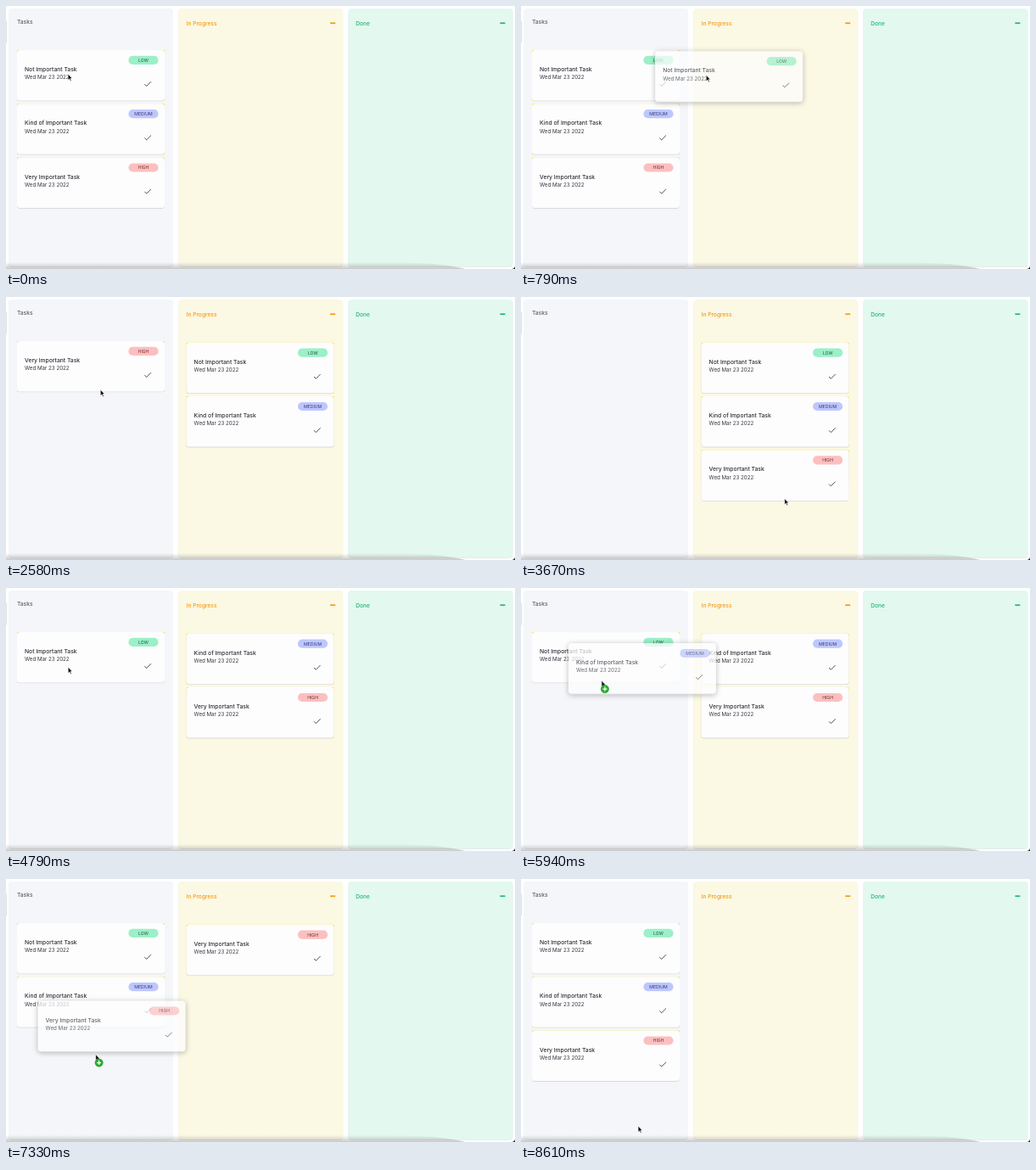
Recreate the animation shown at these times as an HTML page. Size 600 by 310 pixels, loop 8.88 s.

```html
<!DOCTYPE html>
<html lang="en">
<head>
<meta charset="utf-8">
<title>Task board</title>
<style>
html, body { margin: 0; width: 100%; height: 100%; overflow: hidden; background: #fff; }
svg { display: block; width: 100vw; height: 100vh; font-family: Inter, "Open Sans", sans-serif; }
.head { font-size: 6.65px; font-weight: 500; }
.title { font-size: 6.75px; font-weight: 500; fill: #2b2e34; }
.date { font-size: 6.2px; fill: #35383e; }
.pill { font-size: 5.15px; text-anchor: middle; }
.ghost { filter: drop-shadow(0 1.5px 3px rgba(0, 0, 0, .36)); opacity: .72; }
</style>
</head>
<body>
<svg viewBox="0 0 600 310">
  <defs>
    <linearGradient id="fade" x2="0" y2="1">
      <stop stop-color="#555" stop-opacity="0"/>
      <stop offset="1" stop-color="#555" stop-opacity=".32"/>
    </linearGradient>
  </defs>
  <rect width="600" height="310" fill="#fff"/>
  <g id="board"></g>
  <path d="M0 17.5V43.5" stroke="#d4d6d9" stroke-width="1.4"/>
  <path d="M0 302H470Q520 304 542 310H0Z" fill="url(#fade)"/>
  <path d="M600 306.5V310H596.5Q599.5 309.5 600 306.5Z" fill="#222"/>
  <g id="cards"></g>
  <g id="ghosts"></g>
  <g id="cursor">
    <path id="arrow" d="M0 0V7.4L1.7 5.9L2.9 8.5L4.2 7.9L3 5.4H5.2Z" fill="#111" stroke="#fff" stroke-width=".7" stroke-linejoin="round"/>
    <path id="hand" transform="translate(0 -1)" d="M-.8 .7Q0 -.4 .8 .7V3.3Q1.8 2.6 2.4 3.5Q3.3 3 3.8 3.9Q4.9 3.6 4.9 4.8V6.4L4 9H-.2L-2.4 5.8Q-2.6 4.4 -.8 5.5Z" fill="#fff" stroke="#222" stroke-width=".85" stroke-linejoin="round"/>
    <g id="badge" transform="translate(4 10)">
      <circle r="4.7" fill="#27ad2e" stroke="#178a20" stroke-width=".4"/>
      <path d="M-2.5 0H2.5M0 -2.5V2.5" stroke="#fff" stroke-width="1.3"/>
    </g>
  </g>
</svg>
<script>
const LOOP = 8880, DRAG = 565, PAUSE = 90;
const PITCH = 63.3, CARD_W = 174, CARD_H = 59.5;
const $ = id => document.getElementById(id);

const columns = [
  { name: 'Tasks', fill: '#f4f6f9', ink: '#5b5f66' },
  { name: 'In Progress', fill: '#fbf8e4', ink: '#f59b16' },
  { name: 'Done', fill: '#e3f8ef', ink: '#22b573' }
];

const tasks = [
  { title: 'Not Important Task', level: 'LOW', fill: '#9bf0c7', ink: '#1f4f3d' },
  { title: 'Kind of Important Task', level: 'MEDIUM', fill: '#bdc7fc', ink: '#33367c' },
  { title: 'Very Important Task', level: 'HIGH', fill: '#fcbfbf', ink: '#702c2c' }
];

// grab: pointer position inside the card; bend: how late the card moves vertically;
// leave: when the pointer sets off, if it rests after the previous drop
const drags = [
  { task: 0, to: 1, start: 420, grab: [60, 28] },
  { task: 1, to: 1, start: 1440, grab: [94, 40.5], bend: .64 },
  { task: 2, to: 1, start: 2680, grab: [98, 57] },
  { task: 0, to: 0, start: 4080, grab: [57, 41], leave: 3670 },
  { task: 1, to: 0, start: 5545, grab: [39, 44], bend: 7 },
  { task: 2, to: 0, start: 6890, grab: [68, 63], bend: 2.5, leave: 6570 }
];
const exit = { point: [138, 291], leave: 8000, arrive: 8390 };

const slot = (column, row) => [13 + column * 199.6, 52 + column * 1.8 + row * PITCH];
const add = (a, b) => a.map((v, k) => v + b[k]);
const mix = (a, b, u, v = u) => [a[0] + (b[0] - a[0]) * u, a[1] + (b[1] - a[1]) * v];
const ease = (t, from, to) => {
  const u = Math.min(1, Math.max(0, (t - from) / (to - from)));
  return u * u * (3 - 2 * u);
};

// Each drag carries a card from its slot to the end of the other column
const initial = [[0, 1, 2], []];
let lists = initial;
for (const d of drags) {
  const source = lists[1 - d.to];
  d.from = slot(1 - d.to, source.indexOf(d.task));
  d.target = slot(d.to, lists[d.to].length);
  d.drop = d.start + DRAG + PAUSE;
  lists = [...lists];
  lists[1 - d.to] = source.filter(id => id !== d.task);
  lists[d.to] = [...lists[d.to], d.task];
  d.lists = lists;
}

// Pointer hops between drags: from the last release to the next pick-up
const stops = drags.map(d => ({ point: add(d.from, d.grab), arrive: d.start - PAUSE, leave: d.leave }));
const hops = [...stops, exit].map((stop, i) => {
  const last = drags[i - 1];
  return {
    from: last ? add(last.target, last.grab) : stop.point,
    to: stop.point,
    leave: stop.leave ?? (last ? last.drop : 0),
    arrive: stop.arrive
  };
});

function cardMarkup({ title, level, fill, ink }) {
  return `
    <rect class="corner" width="${CARD_W}" height="${CARD_H}" rx=".8" fill="#f0e352"/>
    <rect y=".8" width="${CARD_W}" height="${CARD_H}" rx="3.6" fill="#d9dadb"/>
    <rect width="${CARD_W}" height="${CARD_H}" rx="3.6" fill="#fdfdfe"/>
    <text class="title" x="9" y="25">${title}</text>
    <text class="date" x="9" y="34.4">Wed Mar 23 2022</text>
    <rect x="131.4" y="6.8" width="35.2" height="10.2" rx="5.1" fill="${fill}"/>
    <text class="pill" x="149" y="13.8" fill="${ink}">${level}</text>
    <path d="M150.4 40.2L152.7 42.5L158 37.2" fill="none" stroke="#3a3a3a" stroke-width=".9"/>`;
}

$('board').innerHTML = columns.map(({ name, fill, ink }, i) => {
  const x = 3 + i * 200.2;
  return `
    <rect x="${x}" y="3.8" width="194" height="304" rx="4" fill="#e2e4e6"/>
    <rect x="${x}" y="3" width="194" height="304" rx="4" fill="${fill}"/>
    <text class="head" x="${13 + i * 199.6}" y="${i ? 22.6 : 20.8}" fill="${ink}">${name}</text>
    ${i ? `<path d="M${x + 179} 20.2h6" stroke="${ink}" stroke-width="1.7"/>` : ''}`;
}).join('');
$('cards').innerHTML = tasks.map(t => `<g>${cardMarkup(t)}</g>`).join('');
$('ghosts').innerHTML = tasks.map(t => `<g class="ghost">${cardMarkup(t)}</g>`).join('');
const cards = [...$('cards').children], ghosts = [...$('ghosts').children];
ghosts.forEach(g => g.querySelector('.corner').remove());

const move = (el, [x, y]) => el.setAttribute('transform', `translate(${x} ${y})`);
const show = (el, on) => el.setAttribute('visibility', on ? 'visible' : 'hidden');

function render(t) {
  const done = drags.filter(d => t >= d.drop).length;
  const drag = drags.find(d => t >= d.start && t < d.drop);
  const hop = hops[done];
  const travel = ease(t, hop.leave, hop.arrive);
  let point = mix(hop.from, hop.to, travel);

  ghosts.forEach((g, id) => show(g, drag && drag.task === id));
  if (drag) {
    const u = ease(t, drag.start, drag.start + DRAG);
    const corner = mix(drag.from, drag.target, u, u ** (drag.bend ?? 1));
    move(ghosts[drag.task], corner);
    point = add(corner, drag.grab);
  }

  let hover = false;
  (done ? drags[done - 1].lists : initial).forEach((list, c) => list.forEach((id, row) => {
    const [x, y] = slot(c, row);
    move(cards[id], [x, y]);
    cards[id].firstElementChild.setAttribute('height', row < 2 ? CARD_H : 40);
    hover ||= point[0] > x && point[0] < x + CARD_W && point[1] > y && point[1] < y + CARD_H;
  }));

  const resting = travel === 0 || travel === 1;
  const hand = hover && resting && !drag;
  move($('cursor'), point);
  show($('hand'), hand);
  show($('arrow'), !hand);
  show($('badge'), drag && (drag.to ? point[0] > 240 : point[0] < 160));
}

const begin = performance.now();
function frame() {
  render((performance.now() - begin) % LOOP);
  requestAnimationFrame(frame);
}
render(0);
requestAnimationFrame(frame);
</script>
</body>
</html>
```
